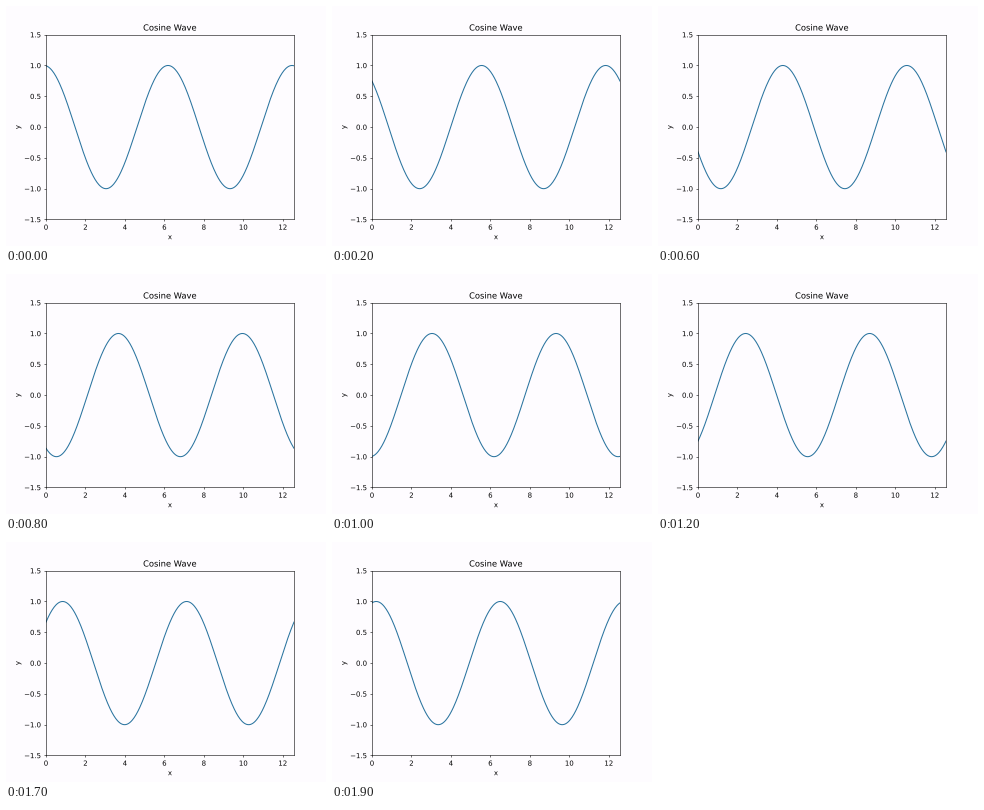
These frames come from a looping animation (320 by 240 pixels, 2000 ms). A matplotlib script:

```python
import numpy as np
import matplotlib.pyplot as plt
from matplotlib.animation import FuncAnimation
from matplotlib.patheffects import Normal

FRAMES = 20
INTERVAL = 100
START_PHASE = 0.1
PAPER = "#fefcff"
BLUE = "#2a749f"

plt.rcParams.update({
    "font.family": "DejaVu Sans",
    "text.hinting": "none",
    "figure.facecolor": PAPER,
    "axes.facecolor": PAPER,
})

fig, ax = plt.subplots(figsize=(6.4, 4.8), dpi=50)
fig.subplots_adjust(left=0.125, right=0.9, bottom=0.1105, top=0.8805)

x = np.linspace(0, 4 * np.pi, 400)
line, = ax.plot(x, np.cos(x + START_PHASE), color=BLUE, lw=1.5)

ax.set_xlim(0, 4 * np.pi)
ax.set_ylim(-1.5, 1.5)
ax.set_title("Cosine Wave")
ax.set_xlabel("x")
ax.set_ylabel("y")

# Outline text keeps its sub-pixel position at this low resolution.
for text in [ax.title, ax.xaxis.label, ax.yaxis.label,
             *ax.get_xticklabels(), *ax.get_yticklabels()]:
    text.set_path_effects([Normal()])


def update(frame):
    phase = START_PHASE + 2 * np.pi * frame / FRAMES
    line.set_ydata(np.cos(x + phase))
    return line,


anim = FuncAnimation(fig, update, frames=FRAMES, interval=INTERVAL,
                     repeat=True, repeat_delay=0, blit=False)
plt.show()
```
